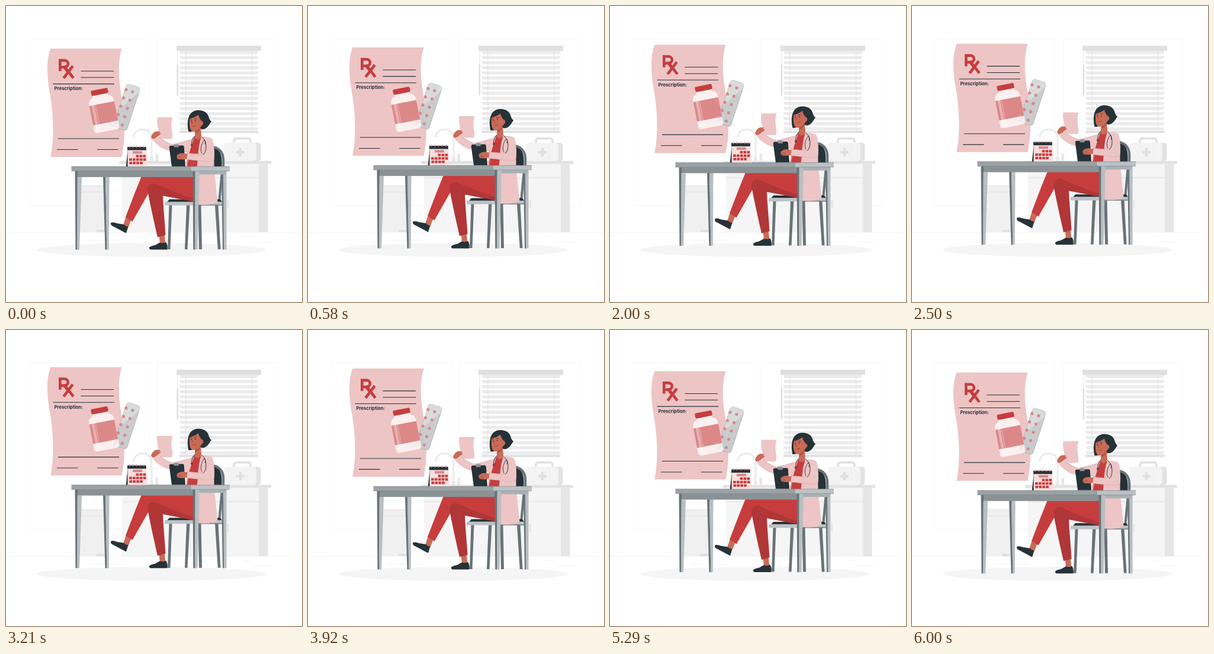
Recreate the animation shown at these times as an HTML page with a canvas. Size 500 by 500 pixels, loop 6.04 s.

```html
<!DOCTYPE html>
<html lang="en">
<head>
<meta charset="utf-8">
<title>Prescription</title>
<style>
html, body { margin: 0; width: 100%; height: 100%; overflow: hidden; background: #fff; }
canvas { display: block; width: 100vw; height: 100vh; }
</style>
</head>
<body>
<canvas id="stage"></canvas>
<script>
const LOOP = 6040, LIFT = 10, SIZE = 500;
const INK = '#263238', RED = '#c73d3d', DEEP = '#b03638', PINK = '#edc5c5', ROSE = '#dc8888';
const SKIN = '#c86b57', STEEL = '#687378', SILVER = '#b8bec1', GREY = '#9ba2a5';

const canvas = document.getElementById('stage');
const ratio = Math.max(1, window.devicePixelRatio || 1);
canvas.width = canvas.height = SIZE * ratio;
const ctx = canvas.getContext('2d');

const cache = new Map();
function path(d) {
  if (!cache.has(d)) cache.set(d, new Path2D(d));
  return cache.get(d);
}
function fill(color, d) {
  ctx.fillStyle = color;
  ctx.fill(path(d));
}
function line(color, width, d) {
  ctx.strokeStyle = color;
  ctx.lineWidth = width;
  ctx.stroke(path(d));
}
function rect(color, x, y, w, h) {
  ctx.fillStyle = color;
  ctx.fillRect(x, y, w, h);
}
function round(color, x, y, w, h, r) {
  ctx.fillStyle = color;
  ctx.beginPath();
  ctx.roundRect(x, y, w, h, r);
  ctx.fill();
}
function dot(color, x, y, rx, ry = rx) {
  ctx.fillStyle = color;
  ctx.beginPath();
  ctx.ellipse(x, y, rx, ry, 0, 0, Math.PI * 2);
  ctx.fill();
}
function turned(x, y, deg, draw) {
  ctx.save();
  ctx.translate(x, y);
  ctx.rotate(deg * Math.PI / 180);
  draw();
  ctx.restore();
}

function room() {
  line('#f8f8f8', 1, 'M39.5 55.5H242.5V337.5H39.5ZM255.5 55.5H458.5V337.5H255.5Z');
  line('#f3f3f3', 0.8, 'M0 382.4H500');
  line('#f3f3f3', 0.8, 'M137 395.5H196M402 389.5H416M416 398.5H449');
  blinds();
  sink();
  kit();
  dot('#f5f5f5', 245.5, 412, 194, 11.7);
}

function blinds() {
  for (let i = 0; i < 16; i++) {
    const y = 76 + i * 8.6;
    fill('#ebebeb', `M292.5 ${y}H427L424 ${y + 5.2}H295.5Z`);
  }
  line('#dedede', 0.8, 'M303.8 76V211M415.7 76V211');
  rect('#e0e0e0', 293, 211, 133.5, 3.6);
  rect('#e0e0e0', 288, 67, 143, 8.8);
  rect('#e0e0e0', 288.5, 99, 2.6, 52);
  line('#e0e0e0', 0.8, 'M289.8 75V100');
}

function sink() {
  line('#ebebeb', 3, 'M246 260V224C246 214 239 208.5 231 208.5C222 208.5 216 214 215.5 222');
  round('#e6e6e6', 252.5, 249.5, 4.5, 13, 1.5);
  round('#ebebeb', 243, 255, 6, 7, 1);
  fill('#f0f0f0', 'M125 303H174V382H125Z');
  rect('#e6e6e6', 125, 303, 49, 1.2);
  rect('#e6e6e6', 125, 313.5, 49, 1.6);
  rect('#e0e0e0', 153, 378, 15, 4);
  rect('#f5f5f5', 196, 267, 231, 115);
  rect('#e6e6e6', 427, 267, 15.5, 115);
  rect('#e8e8e8', 196, 289, 231, 1.8);
  rect('#e8e8e8', 311, 291, 1.2, 91);
  rect('#e6e6e6', 373.5, 328, 3, 13);
  rect('#e2e2e2', 191, 261.7, 257, 5);
}

function kit() {
  line('#e0e0e0', 3.4, 'M385 232V228Q385 223.7 389 223.7H409Q413 223.7 413 228V232');
  round('#e2e2e2', 376, 231, 54.5, 31, 5);
  round('#f3f3f3', 368, 231, 55, 31, 5);
  line('#ebebeb', 0.8, 'M407.5 231V262');
  fill('#e0e0e0', 'M393.7 240H398.3V244.7H403V249.3H398.3V254H393.7V249.3H389V244.7H393.7Z');
}

function sheet() {
  fill(PINK, 'M75.3 72H195C189 93 189 113 193 142C198 178 204 212 195 255H75.3C82 222 80 184 74.5 150C68.5 116 68 92 75.3 72Z');
  line('#dfb2b4', 0.5, 'M195 72C189 93 189 113 193 142C198 178 204 212 195 255');
  line(RED, 4.6, 'M91.3 110V91.9H98.2C107 91.9 107 103.2 98.2 103.2H92M98.2 103L104 110.5');
  line(RED, 4.7, 'M98 101.3L113.8 121.8M112.8 101.3L97.3 121.8');
  line(INK, 1.05, 'M126.5 109.9H182M126.5 120.8H182M79.5 131.6H183M88 224H191M86 242.4H121.5M154 242.4H189.5');
  ctx.fillStyle = INK;
  ctx.font = '700 7.7px Inter, "Open Sans", sans-serif';
  ctx.fillText('Prescription:', 81.5, 142.2);
}

function pills() {
  turned(204, 171, 18, () => {
    round('#9a9fa1', -12.2, -38.5, 24.4, 77, 5);
    round('#c9cbcc', -11.7, -38, 23.4, 76, 4.6);
    fill('#d9dbdb', 'M-11.7 -34Q-11.7 -38 -8 -38H8Q11.7 -38 11.7 -34V-30L-11.7 8Z');
  });
  for (let i = 0; i < 5; i++) {
    dot(ROSE, 202.8 - i * 4.4, 141.3 + i * 14, 2.6);
    dot(ROSE, 213.8 - i * 4.4, 145 + i * 14, 2.6);
  }
}

function bottle() {
  turned(164.8, 180, -11, () => {
    fill('rgba(255,252,252,.8)', 'M-13 -32H13V-28C17 -27 21.5 -24 21.5 -17V27Q21.5 32 16 32H-16Q-21.5 32 -21.5 27V-17C-21.5 -24 -17 -27 -13 -28Z');
    rect(ROSE, -21.5, -15.5, 43, 33.5);
    rect('rgba(255,255,255,.35)', -17.5, -17, 4.5, 45);
    rect('rgba(255,255,255,.35)', -11.5, -17, 1.2, 45);
    round(RED, -14.5, -40, 29, 9, 2.5);
  });
  ctx.globalAlpha = 0.5;
  line('#d7cfcf', 0.7, 'M176 198Q176 193 181 193Q186 192 188 196Q187 202 181 202Q176 202 176 198Z');
  ctx.globalAlpha = 1;
}

function chair() {
  fill(INK, 'M345 237C357 237 364.5 247 364.5 262V273H345Z');
  line(STEEL, 4, 'M347 238C360 238.5 367.2 248 367.2 260V272');
  fill(STEEL, 'M362.5 284H366.8L362 332H358Z');
  fill(STEEL, 'M275.5 336H280.5L277.5 411H273Z');
  fill(STEEL, 'M305 336H310.5L306.5 411H302Z');
  fill(STEEL, 'M324.5 336H329.5L331 411H326Z');
  fill(STEEL, 'M353 336H358.5L362.5 411H357.8Z');
  fill(INK, 'M272 331L276 326.5H362L365 331Z');
  rect('#bcc3c6', 268, 330.7, 99, 6);
  rect(STEEL, 316, 335.6, 51, 1.3);
}

function legs() {
  fill(PINK, 'M324 280H352L357.5 331C348 336.5 336 337 324 335Z');
  line('#d7a5a7', 0.6, 'M326 285L325 335');
  fill(SKIN, 'M203 355L212 360L206.5 374L198 370Z');
  fill(INK, 'M177.2 366Q182 364.5 187 367L199 369Q203 373 206.5 372.5L203 383.8L199.5 382L178.8 371Q176.3 369 177.2 366Z');
  fill(RED, 'M230 285H317V327L262 314L242 314L213.5 364L202 356.5L217.5 316Z');
  fill(SKIN, 'M258.5 386L267.5 384L269.5 402H260Z');
  fill(INK, 'M242 407.5Q246 404.5 252 404L260 399.5Q265 401.5 270.5 399Q273.5 405 272.5 411.5H244Q241.5 410.5 242 407.5Z');
  fill(DEEP, 'M239 311C238 303 244 299 251 299.5C270 308 292 317 316.5 325V330.5L265 320.5C266 345 268.5 368 269.5 387L256 390.5Q245 343 239 311Z');
}

function head() {
  fill(INK, 'M308.5 212.5C305 198 306 176 325 176C335 176 341.5 181 343 189.5Q344.5 193.5 347.2 195.3C343.5 198 343 205 334.5 208Q329 209 325 206L314 212Z');
  fill(SKIN, 'M319.5 206H329L330 220Q325 225 319 223Z');
  fill('#a9503f', 'M319.5 209L328 207Q326 213 320 215Z');
  fill(SKIN, 'M310.5 190C314 189.5 321 187 325 183.5C326 189 329 193 332 195C333.5 200 329 205 327 206C325 211 319 213 315 211.8C310 210 309 198 310.5 190Z');
  dot(SKIN, 331, 198, 2.2, 3);
  dot(INK, 313, 194.4, 0.8, 1.1);
  dot(INK, 319.8, 193.8, 0.8, 1.1);
  line(INK, 0.8, 'M311.3 191.5L314 190.7M318 190.5L322 190.3');
  line('#9a4436', 0.7, 'M315.3 194.5L314.3 199H316');
  line('#8d342e', 0.8, 'M315.5 203.5Q319 204.4 321 201.8');
}

function torso() {
  fill(PINK, 'M255.5 188H281C278.5 196 278.5 203 280 211C281 216 281.3 220 280 224H256.5C258.5 218 257.8 211 256.3 204C255.3 198 254.5 193 255.5 188Z');
  line('#dcaeb0', 0.5, 'M281 188C278.5 196 278.5 203 280 211C281 216 281.3 220 280 224H256.5');
  fill(RED, 'M315 223L320 220L330 222L327 245L323 273H305L307 238Z');
  fill(SKIN, 'M319.5 214H329.5L329 222Q324 229 318.5 222Z');
  fill(PINK, 'M330 221Q342 220.5 347.5 223.5C352 228 352 243 351.5 266V273H322.5C325 255 323.5 240 330 221Z');
  fill(PINK, 'M318 221.5L312 225.5Q296 230.5 281 233.8Q270 230 259 221L247.5 225Q255 236 270 242.5Q290 247.5 307 247L306 273L309 250Z');
  line('#d7a5a7', 0.6, 'M258 221.5Q270 231 281 233.8Q297 230.5 312 226M248 225.5Q256 236.5 270 242.5Q290 247.5 307 247');
  fill(SKIN, 'M245 222C246 217 249 213 254 211.5L261 212.2L258.5 214L262 215.5Q258 219 254.5 222Q250 225 247 224.5Z');
  fill(INK, 'M277.5 236L299 235.5Q300.5 236 300.8 238L303 271H280L275.7 239Q275.5 236.5 277.5 236Z');
  fill('#8b9598', 'M283 235L285 233.5H291L292 235.5L291.5 238.5H284Z');
  fill(PINK, 'M337 236L350 235Q353 246 351.5 259Q347 264 336 262.5L304 259L305.5 248.5L334 251Z');
  line('#d7a5a7', 0.6, 'M337 236L334 251L305.5 248.5L304 259L336 262.5Q347 264 351 260');
  fill(SKIN, 'M306.5 249.5L298 248.5Q291 249 288.5 253Q288 258 291.5 259L299 259.5L305.5 258Z');
  line('#9f4c3d', 0.6, 'M290 254.5H296M291 257H297');
  line(INK, 1, 'M319.5 219C314.5 224 313.5 229 313.6 233M329.5 220C336 225 337.5 230 336 234');
  line(INK, 0.9, 'M336 227C339 235 339 247 333 251M335 226C329 234 328 243 331 249');
  dot(INK, 313.7, 235, 1.6, 2);
  dot('#909a9d', 313.7, 235, 0.7);
}

function desk() {
  // far legs and rails
  fill(STEEL, 'M364 284H368L369 411.5H366Z');
  fill(SILVER, 'M367 284H372.5V411.5H368Z');
  fill(STEEL, 'M164 288H168L170.5 411.5H167.5Z');
  fill(SILVER, 'M168 288H174.5L173.7 411.5H170.3Z');
  rect('#8b9295', 117, 278, 199, 11);
  rect('#aab1b4', 316, 278, 56.5, 6.5);
  // near legs and top
  fill(STEEL, 'M116.5 279H121L120.5 411.5H117.5Z');
  fill(SILVER, 'M120.5 289H128L124 411.5H120Z');
  fill(STEEL, 'M315.5 279H320L319.5 411.5H316.3Z');
  fill(SILVER, 'M319.5 279H326.5L323.5 411.5H319.2Z');
  rect(GREY, 110.5, 271, 201.5, 7.8);
  rect('#bbc1c4', 312, 271, 66, 7.8);
  line('#7b8488', 0.6, 'M110.5 271.2H378M110.5 278.8H378M312 271V279');
}

function calendar() {
  fill(INK, 'M206 240L202.7 271H208Z');
  fill('#f6dfdf', 'M205.5 243H237L239.2 271H205.5Z');
  fill(INK, 'M205 238H236.5L237 243.5H205Z');
  line(ROSE, 1, 'M208.5 236V240M214.5 236V240M220.7 236V240M227 236V240M233 236V240');
  rect(ROSE, 214, 245.2, 16, 4.3);
  for (let row = 0; row < 3; row++) {
    const from = row ? 0 : 2, to = row === 2 ? 3 : 4;
    for (let col = from; col <= to; col++) {
      rect(RED, 207.8 + col * 5.9 + row * 0.3, 251.5 + row * 5.8, 4.7, 4.2);
    }
  }
}

function frame(time) {
  const t = time % LOOP / LOOP;
  const lift = LIFT * (1 - Math.abs(1 - 2 * t));
  ctx.setTransform(ratio, 0, 0, ratio, 0, 0);
  rect('#fff', 0, 0, SIZE, SIZE);
  room();
  ctx.translate(0, -lift);
  sheet();
  pills();
  bottle();
  chair();
  legs();
  torso();
  head();
  desk();
  calendar();
}

let start;
function tick(now) {
  start ??= now;
  frame(now - start);
  requestAnimationFrame(tick);
}
requestAnimationFrame(tick);
</script>
</body>
</html>
```
